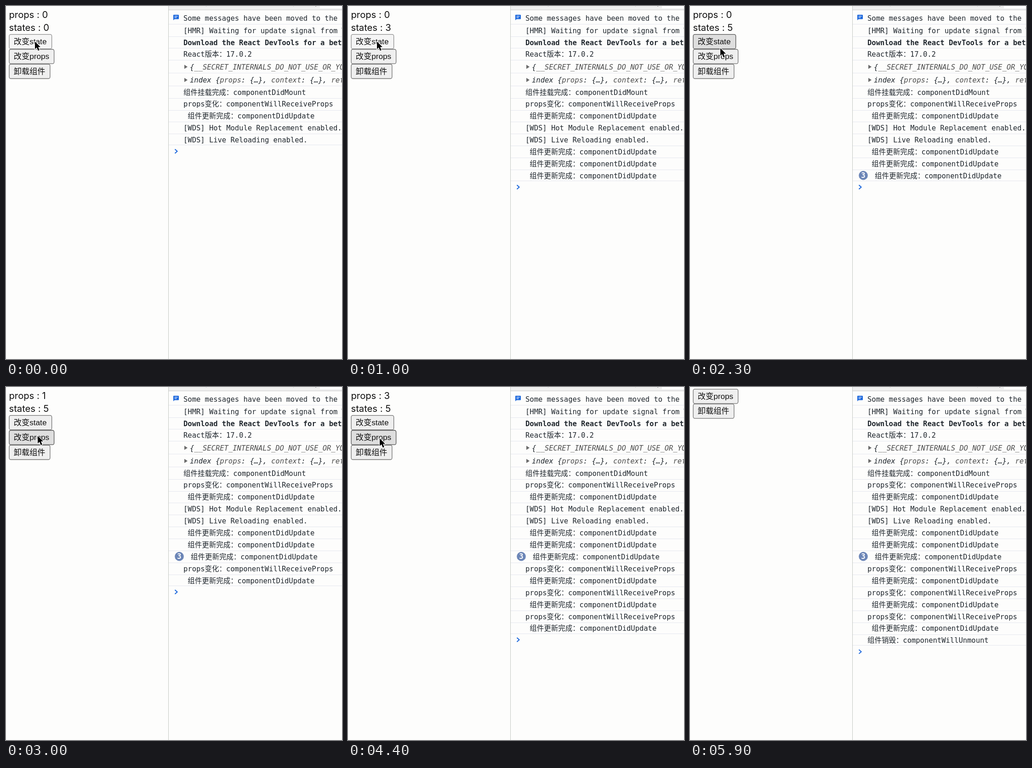
Recreate the animation shown at these times as an HTML page with a canvas. Size 731 by 766 pixels, loop 6 s.

```html
<!DOCTYPE html>
<html lang="zh-CN">
<head>
<meta charset="utf-8">
<style>
html, body { margin: 0; width: 100%; height: 100%; overflow: hidden; background: #fdfdfc; }
canvas { display: block; }
</style>
</head>
<body>
<canvas id="stage" width="731" height="766"></canvas>
<script>
const ctx = document.getElementById('stage').getContext('2d');
const LOOP = 6000, PRESS = 120, CHAR = 9.318;
const CJK = '"Noto Sans CJK SC", "Noto Sans CJK"';
const MONO = `15.48px "DejaVu Sans Mono", ${CJK}, monospace`;
const PAGE = `20.2px Inter, ${CJK}, sans-serif`;
const BUTTON = `17.2px "Liberation Sans", ${CJK}, sans-serif`;
const INK = '#1f262d', BLUE = '#1a66dc', RULE = '#e5e7ef';

// Moments at which the mouse button is released
const stateClicks = [100, 400, 800, 1100, 1400];
const propClicks = [2700, 3200, 3600];
const unmountAt = 5100;
const clicks = [...stateClicks, ...propClicks, unmountAt];
const moves = [
  { from: 2100, to: 2500, x: 69, y: 106 },
  { from: 4300, to: 4700, x: 69, y: 141 },
  { from: 5300, to: 5580, x: 760, y: -30 },
];
const buttons = [
  { label: '改变state', y: 61.7, w: 92.6 },
  { label: '改变props', y: 94, w: 97.6 },
  { label: '卸载组件', y: 126.3, w: 88.8 },
];

const UPDATED = ' 组件更新完成：componentDidUpdate';
const PROPS = 'props变化：componentWillReceiveProps';
const header = [
  [26, 'Some messages have been moved to the Issues panel.'],
  [53, '[HMR] Waiting update signal from WDS...'.replace('update', 'for update')],
  [79, 'Download the React DevTools for a better development experience', 'bold'],
  [104.5, 'React版本：17.0.2'],
];
const objects = [
  [132, ['{', '__SECRET_INTERNALS_DO_NOT_USE_OR_YOU']],
  [160.5, ['index {', 'props', ': {…}, ', 'context', ': {…}, ', 'refs']],
];
const startLog = ['组件挂载完成：componentDidMount', PROPS, UPDATED,
  '[WDS] Hot Module Replacement enabled.', '[WDS] Live Reloading enabled.'];

const countBefore = (list, t) => list.filter(c => t >= c).length;

function text(str, x, y, font, color = INK) {
  ctx.font = font;
  ctx.fillStyle = color;
  ctx.fillText(str, x, y);
}

function rect(x, y, w, h, color) {
  ctx.fillStyle = color;
  ctx.fillRect(x, y, w, h);
}

function shape(points, x, y) {
  ctx.beginPath();
  points.forEach(([px, py]) => ctx.lineTo(x + px, y + py));
}

function rule(y) {
  rect(354, Math.round(y), 377, 1, RULE);
}

function pointer(t) {
  let x = 63, y = 77;
  for (const m of moves) {
    const p = Math.min(1, Math.max(0, (t - m.from) / (m.to - m.from)));
    const ease = p * p * (3 - 2 * p);
    x += (m.x - x) * ease;
    y += (m.y - y) * ease;
  }
  return { x, y };
}

function drawPage(t, mouse) {
  const unmounted = t >= unmountAt;
  const lift = unmounted ? 89.4 : 0;
  if (!unmounted) {
    text('props : ' + countBefore(propClicks, t), 6.5, 26, PAGE, '#111');
    text('states : ' + countBefore(stateClicks, t), 6.5, 54.3, PAGE, '#111');
  }
  const pressed = clicks.some(c => t >= c - PRESS && t < c);
  buttons.slice(unmounted ? 1 : 0).forEach(({ label, y, w }) => {
    const top = y - lift;
    const hover = mouse.x > 7 && mouse.x < 7 + w && mouse.y > top && mouse.y < top + 31.5;
    ctx.beginPath();
    ctx.roundRect(7, top, w, 31.2, 3.5);
    ctx.fillStyle = !hover ? '#efefef' : pressed ? '#f5f5f5' : '#dedede';
    ctx.fill();
    ctx.lineWidth = 1.3;
    ctx.strokeStyle = !hover ? '#707070' : pressed ? '#8d8d8d' : '#505050';
    ctx.stroke();
    text(label, 16.8, top + 21.3, BUTTON, '#111');
  });
}

function drawFrame() {
  rect(353, 0, 1, 766, '#c5c8c4');
  rect(354, 0, 377, 8, '#efefef');
  rect(354, 8, 377, 1, '#cdcdcd');
  rect(683, 0, 48, 5, '#fff');
  rect(435, 0, 1, 1, '#bbb');
  rect(625, 0, 1, 1, '#bbb');
  rect(673, 0, 2, 1, '#888');
}

function drawHeader() {
  ctx.fillStyle = BLUE;
  ctx.beginPath();
  ctx.roundRect(364, 19, 12, 9.5, 1.2);
  ctx.fill();
  shape([[0, 0], [0, 12], [4, 8]], 364, 19);
  ctx.fill();
  rect(366.5, 21.5, 7, 1.2, '#fff');
  rect(366.5, 24.5, 5, 1.2, '#fff');

  header.forEach(([y, str, weight = '']) => text(str, 386, y + 5.5, weight + ' ' + MONO));
  objects.forEach(([y, parts]) => {
    shape([[0, -4.5], [7, 0], [0, 4.5]], 388, y);
    ctx.fillStyle = '#6b6b6b';
    ctx.fill();
    let x = 400;
    parts.forEach((part, i) => {
      text(part, x, y + 5.5, 'italic ' + MONO, i % 2 ? '#4c4c4c' : INK);
      x += part.length * CHAR;
    });
  });
  [39, 66, 91, 117, 145, 173].forEach(rule);
}

function drawLog(t) {
  const updates = countBefore(stateClicks, t);
  const repeat = Math.max(1, updates - 2);
  const rows = [...startLog, ...Array(Math.min(3, updates)).fill(UPDATED)];
  const badgeRow = repeat > 1 ? 7 : -1;
  for (let i = countBefore(propClicks, t); i > 0; i--) rows.push(PROPS, UPDATED);
  if (t >= unmountAt) rows.push('组件销毁：componentWillUnmount');

  let y = 187;
  rows.forEach((row, i) => {
    y = 187 + i * 25.92;
    const last = i === rows.length - 1;
    text(row, i === badgeRow ? 392.7 : 386, y + 5.5, MONO);
    rule(y + (last ? 10.6 : 12.6));
    if (i === badgeRow) {
      ctx.fillStyle = '#6c86b7';
      ctx.beginPath();
      ctx.arc(377, y - 0.8, 9.8, 0, 7);
      ctx.fill();
      text(repeat, 372.3, y + 4.8, 'bold ' + MONO, '#fff');
    }
  });
  shape([[0, -4.5], [5, 0], [0, 4.5]], 367.5, y + 24.5);
  ctx.lineWidth = 2;
  ctx.strokeStyle = BLUE;
  ctx.stroke();
}

function drawPointer({ x, y }) {
  shape([[0, 0], [0, 16.5], [3.8, 13], [6.8, 20], [9.8, 18.7], [7, 12], [12, 12]], x, y);
  ctx.closePath();
  ctx.lineWidth = 2.4;
  ctx.lineJoin = 'round';
  ctx.strokeStyle = '#fff';
  ctx.stroke();
  ctx.lineJoin = 'miter';
  ctx.fillStyle = '#000';
  ctx.fill();
}

function draw() {
  const t = performance.now() % LOOP;
  const mouse = pointer(t);
  rect(0, 0, 731, 766, '#fdfdfc');
  drawFrame();
  drawHeader();
  drawLog(t);
  drawPage(t, mouse);
  drawPointer(mouse);
  requestAnimationFrame(draw);
}
draw();
</script>
</body>
</html>
```
